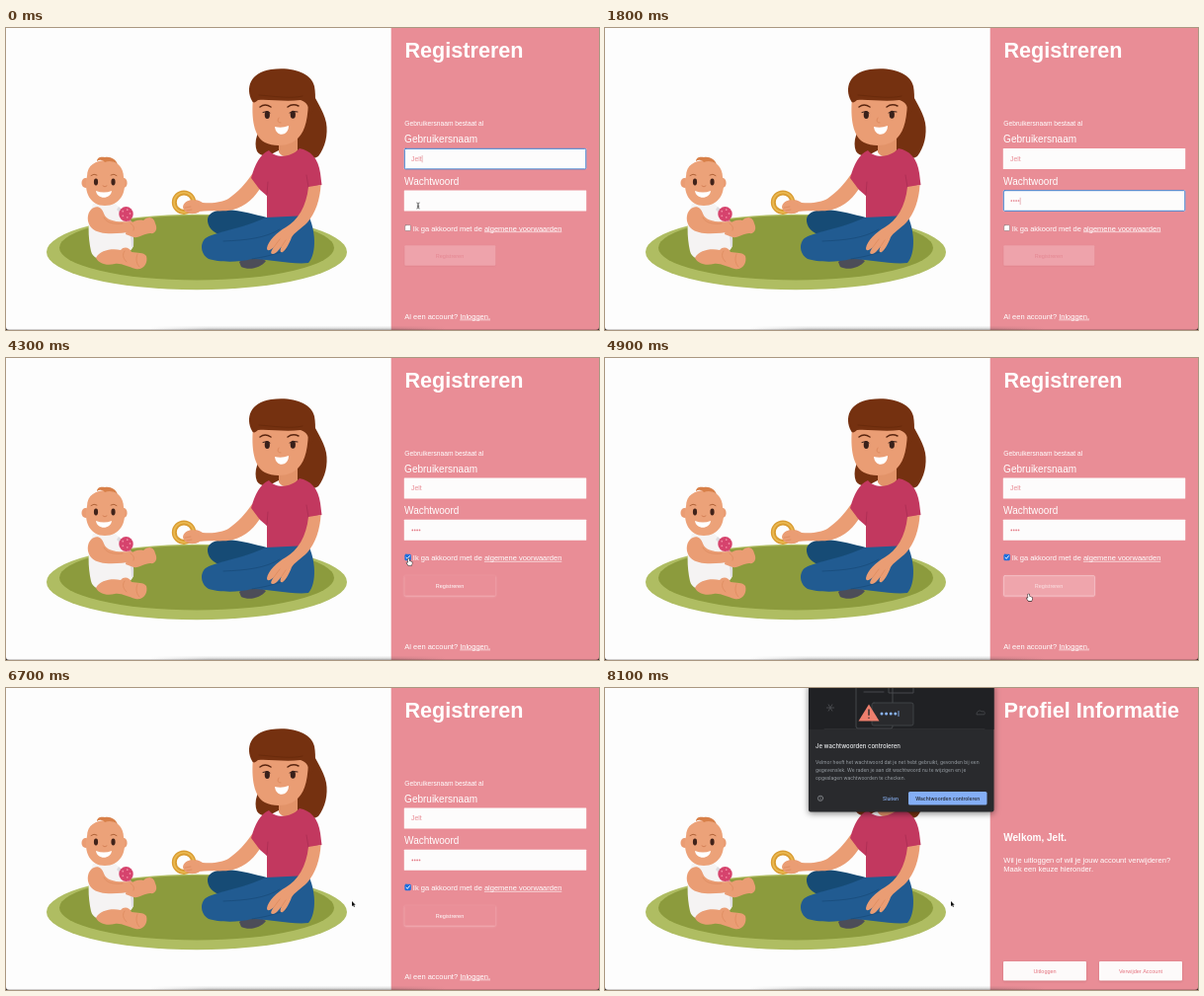
Write an HTML page with a canvas that moves like this. It is 600x306 px and loops after 8.2 s.

```html
<!DOCTYPE html>
<html lang="nl">
<head>
<meta charset="utf-8">
<title>Registreren</title>
<style>
  html, body { margin: 0; width: 100%; height: 100%; overflow: hidden; background: #fdfdfd; }
  canvas { display: block; width: 600px; height: 306px; }
</style>
</head>
<body>
<canvas id="stage"></canvas>
<script>
const W = 600, H = 306, LOOP = 8200;
const PINK = '#e98d96', SKIN = '#ea9d74', SKIN_DARK = '#d98558', HAIR = '#753110';
const SANS = '"Liberation Sans", Arial, sans-serif';
const UI = 'Inter, Roboto, sans-serif';
const USER = 'Jelt';

const canvas = document.getElementById('stage');
const ctx = canvas.getContext('2d');
const dpr = window.devicePixelRatio || 1;
canvas.width = W * dpr;
canvas.height = H * dpr;

// Moments at which the page reacts
const T = { focus: 350, type: 1100, key: 190, check: 3900, hover: 4650, leave: 5550, profile: 6800, dialog: 7700 };

// Pointer path: time, x, y
const ROUTE = [
  [0, 417, 177], [2700, 417, 177], [3250, 406, 202.5], [4250, 406, 202.5],
  [4750, 428, 239.5], [5450, 428, 239.5], [6000, 350, 216], [LOOP, 350, 216]
];

function fill(d, color) {
  ctx.fillStyle = color;
  ctx.fill(new Path2D(d));
}

function line(d, color, width = 1) {
  ctx.strokeStyle = color;
  ctx.lineWidth = width;
  ctx.lineCap = ctx.lineJoin = 'round';
  ctx.stroke(new Path2D(d));
}

function oval(x, y, rx, ry, color) {
  ctx.fillStyle = color;
  ctx.beginPath();
  ctx.ellipse(x, y, rx, ry, 0, 0, Math.PI * 2);
  ctx.fill();
}

function ring(x, y, r, color, width) {
  ctx.beginPath();
  ctx.arc(x, y, r, 0, Math.PI * 2);
  ctx.strokeStyle = color;
  ctx.lineWidth = width;
  ctx.stroke();
}

function box(x, y, w, h, r, color, edge, width = 1) {
  ctx.beginPath();
  ctx.roundRect(x, y, w, h, r);
  if (color) { ctx.fillStyle = color; ctx.fill(); }
  if (edge) { ctx.strokeStyle = edge; ctx.lineWidth = width; ctx.stroke(); }
}

function shadowed(color, blur, dy, draw) {
  ctx.save();
  ctx.shadowColor = color;
  ctx.shadowBlur = blur * dpr;
  ctx.shadowOffsetY = dy * dpr;
  draw();
  ctx.restore();
}

function text(str, x, y, size, color = '#fff', { weight = 400, font = SANS, align = 'left', under = false } = {}) {
  ctx.font = `${weight} ${size}px ${font}`;
  ctx.textAlign = align;
  ctx.fillStyle = color;
  ctx.fillText(str, x, y);
  const w = ctx.measureText(str).width;
  if (under) ctx.fillRect(x, y + 0.9, w, 0.6);
  return x + w;
}

function drawRug() {
  oval(193, 227, 152, 38.2, '#afbd62');
  oval(193, 222.7, 139, 32.7, '#8c9b3d');
}

function drawBaby() {
  // Onesie
  fill('M88 178C82 194 83 212 86 226C88 234 97 236 106 234C117 232 126 228 129 221C130 204 122 186 110 178Z', '#f5f3f3');
  fill('M112 184C121 192 127 206 127 222L129 221C131 204 123 188 114 181Z', '#dedce0');
  // Legs
  fill('M121 209C122 199 131 193 139 195C143 190 150 191 151 198C154 204 151 209 146 208C140 208 135 213 129 212Z', SKIN);
  fill('M91 233C95 225 107 223 116 225C119 221 125 222 127 227C133 228 139 227 142 231C144 238 139 246 131 244C123 242 117 238 110 239C102 241 94 239 91 233Z', SKIN);
  line('M120 226C117 230 119 234 122 237M133 229C131 234 132 239 135 242', SKIN_DARK, 0.6);
  // Rattle
  line('M122 190L128 200', '#e58ba0', 2.4);
  oval(121.5, 188.5, 7.2, 7.4, '#d6436d');
  for (let i = 0; i < 5; i++) {
    const a = i * Math.PI * 0.4;
    oval(121.5 + 4 * Math.cos(a), 188 + 4 * Math.sin(a), 0.9, 0.9, '#f08aa3');
  }
  // Arm
  fill('M86 184C91 179 97 181 99 188C102 196 113 197 125 196C132 196 134 204 128 206C113 209 94 210 87 203C81 197 82 188 86 184Z', SKIN);
  line('M99 192C102 198 110 199 118 198M126 198C129 200 130 202 129 205', SKIN_DARK, 0.6);
  // Head
  oval(80.5, 157, 4, 5, SKIN);
  oval(119, 157, 3.6, 5, SKIN);
  fill('M82 150C82 139 91 134 101 134C112 134 119 141 119 151C123 167 115 180 100 180C86 180 78 167 82 150Z', '#eca279');
  fill('M92 135C92 131 96 130 100 131C106 130 111 133 113 138C108 134.5 104 134.5 100 136C98 133.5 95 133 92 135Z', '#d88049');
  line('M86 149.5Q89 147 92 149M106 149Q109 147 112 149.5', '#a95c32', 0.9);
  oval(91, 156, 2.1, 3.4, '#40231a');
  oval(108.5, 156, 2.1, 3.4, '#40231a');
  line('M98 160Q100 162 102 160', '#d27d53', 0.9);
  fill('M91 165Q99 168 107 165C106 174 92 174 91 165Z', '#fff');
}

function drawMother() {
  // Hair behind the face
  fill('M262 96C255 103 250 115 254 125C258 131 266 130 272 126L288 118L288 126C296 133 308 135 316 130C323 121 326 108 324 96C321 82 313 74 308 60Z', HAIR);
  // Back leg
  fill('M204 196C203 188 211 184 223 184C239 185 252 189 264 192L304 190L300 206L222 211C212 209 205 204 204 196Z', '#164b75');
  // Neck and far arm
  fill('M276 112L295 108L295 124C290 133 280 132 276 126Z', '#e29369');
  fill('M249 148L259 159C253 171 242 181 230 184C217 187 207 184 195 186C190 190 183 188 180 185L181 178C186 173 193 173 199 177C211 178 219 176 225 173C235 166 242 158 249 148Z', SKIN);
  // Shirt
  fill('M266 124C272 132 288 132 297 122C308 124 316 132 318 147L319.5 159L306 162L306 194L264 193L264 170L257 164L248 152C252 138 257 128 266 124Z', '#c2385f');
  line('M264 169L265 156M306 161L304 149', '#a62c51', 0.7);
  // Face
  fill('M250 70C248 92 251 110 262 116C272 121 288 120 296 111C303 104 306 90 306 70C290 60 266 61 250 70Z', SKIN);
  fill('M249 74C242 61 247 45 268 42C291 39 309 46 312 59C314 70 313 84 308 89C307 81 305 75 298 73C282 75 266 72 255 73C252 76 250 76 249 74Z', HAIR);
  line('M256 68C270 69 287 72 300 69', '#622809', 0.6);
  line('M257 80Q262 76 268 80M285 80Q290 76 296 79', '#5a2610', 1.5);
  line('M260 85.5L264 84.5L267 86M287 86L291 84.5L295 85', '#38201a', 1);
  oval(264.3, 88, 2.6, 4, '#38201a');
  oval(290.3, 87.7, 2.6, 4, '#38201a');
  line('M276 91Q273 96 278 96', SKIN_DARK, 0.8);
  fill('M272 100Q279 102 286 99C286 110 273 111 272 100Z', '#fff');
  // Shoe and front leg
  fill('M236 237C243 231 255 231 263 236C258 243 246 246 238 242Z', '#4c4d58');
  fill('M263 192L306 190C313 204 315 228 306 238C290 240 266 234 249 234C234 238 214 237 205 234C198 230 196 221 200 215C206 207 232 206 263 192Z', '#215b91');
  line('M220 216C244 215 262 213 277 204M249 234C260 232 273 230 284 224', '#184a78', 0.7);
  // Near arm
  fill('M306 161L318.5 159C318 173 313 188 305 197C298 204 292 207 289 212C287 218 283 225 280 227C277 228 277 225 279 221C276 225 273 229 270 229C267 229 268 226 271 222C268 225 264 227 264 223C265 216 274 207 283 202C295 195 304 181 306 161Z', SKIN);
  line('M271 222L277 214M279 221L283 215', SKIN_DARK, 0.6);
  // Toy ring
  ring(180, 176.7, 9.7, '#d99c32', 5);
  ring(180, 176.7, 10, '#ebba53', 1.6);
  fill('M179 181C180 176 186 173 194 175L196 186C190 190 179 188 179 181Z', SKIN);
  line('M181 182L187 181M183 185L188 184', SKIN_DARK, 0.6);
}

function drawWindowEdge() {
  const g = ctx.createLinearGradient(146, 0, 446, 0);
  g.addColorStop(0, 'rgba(60,60,60,0)');
  g.addColorStop(0.2, 'rgba(60,60,60,.11)');
  g.addColorStop(0.8, 'rgba(60,60,60,.11)');
  g.addColorStop(1, 'rgba(60,60,60,0)');
  ctx.fillStyle = g;
  ctx.fillRect(146, 302.5, 300, 3.5);
  ctx.fillRect(146, 304, 300, 2);
  ctx.fillStyle = 'rgba(40,30,32,.35)';
  ctx.fillRect(0, 305.4, W, 0.6);
  fill('M0 303Q0 306 3 306H0ZM600 303Q600 306 597 306H600Z', '#2a2627');
}

function drawInput(y, focused) {
  box(402.8, y, 184.4, 21, 0.5, '#fdfcfc');
  if (focused) box(403.3, y + 0.3, 183.5, 20.6, 1, null, '#3f7fce', 1);
}

function drawCaret(x, y) {
  ctx.fillStyle = '#d9868f';
  ctx.fillRect(x + 0.2, y - 6, 0.6, 7.3);
}

function drawForm(t) {
  const checked = t >= T.check;
  const inName = t < T.focus;
  const inPass = !inName && !checked;
  const dots = Math.max(0, Math.min(4, Math.floor((t - T.type) / T.key) + 1));
  const lastKey = dots ? T.type + (dots - 1) * T.key : T.focus;
  const caretOn = (t - lastKey) % 1000 < 500;

  text('Registreren', 403.5, 30, 21.6, '#fff', { weight: 700 });
  ctx.save();
  if (checked) ctx.translate(0, -0.6);
  text('Gebruikersnaam bestaat al', 403.3, 99.2, 6.66);
  text('Gebruikersnaam', 403.1, 116.3, 10);
  drawInput(122, inName);
  const nameEnd = text(USER, 410, 135, 6.8, PINK);
  if (inName) drawCaret(nameEnd, 135);

  text('Wachtwoord', 403.1, 158.8, 10);
  drawInput(164.4, inPass);
  for (let i = 0; i < dots; i++) oval(411.3 + i * 2.4, 175, 0.85, 0.85, '#e37985');
  if (inPass && caretOn) drawCaret(410 + dots * 2.4, 177.8);

  box(403.7, 199.7, 5.8, 5.8, 1, checked ? '#1f6fde' : '#fff', checked ? '#1f6fde' : '#8b7376', 0.6);
  if (checked) line('M405 202.7L406.2 204L408.4 201.1', '#fff', 0.9);
  const x = text('Ik ga akkoord met de ', 411.8, 205.6, 7.5);
  text('algemene voorwaarden', x, 205.6, 7.5, '#fff', { under: true });
  ctx.restore();

  const hover = t >= T.hover && t < T.leave;
  const face = hover ? '#efa5ac' : checked ? '#ea8f98' : '#eea3ab';
  shadowed(checked ? 'rgba(255,225,228,.55)' : 'rgba(190,90,100,.2)', 2, 0.6,
    () => box(403.3, 220.3, 92, 20.5, 1, face));
  if (hover) box(403.6, 220.6, 91.8, 20.5, 1, null, '#f5c3c8', 0.8);
  text('Registreren', 449, 232.7, 5.5, hover ? '#fbe3e5' : checked ? '#fff' : '#e48691', { align: 'center' });

  const end = text('Al een account? ', 403.3, 294.7, 7.5);
  text('Inloggen.', end, 294.7, 7.5, '#fff', { under: true });
}

function drawProfile() {
  text('Profiel Informatie', 403.5, 30, 21.6, '#fff', { weight: 700 });
  text(`Welkom, ${USER}.`, 403.3, 155, 10, '#fff', { weight: 700 });
  text('Wil je uitloggen of wil je jouw account verwijderen?', 403.3, 177.2, 7.53);
  text('Maak een keuze hieronder.', 403.3, 185.9, 7.53);
  [['Uitloggen', 403], ['Verwijder Account', 500]].forEach(([label, x]) => {
    shadowed('rgba(150,60,70,.35)', 2.5, 0.8, () => box(x, 277, 84, 19.5, 1, '#fdfafa'));
    text(label, x + 42, 288.8, 5.5, '#e5727e', { align: 'center' });
  });
}

function drawDialog(t) {
  ctx.save();
  ctx.globalAlpha = Math.min(1, (t - T.dialog) / 120);
  shadowed('rgba(0,0,0,.5)', 6, 1.5, () => box(206, -4, 187.5, 129.5, 2, '#292a2d'));
  ctx.fillStyle = '#202124';
  ctx.fillRect(206, 0, 187.5, 42);

  const grey = '#4b4d51';
  for (let i = 0; i < 3; i++) {
    const a = i * Math.PI / 3, c = 3.6 * Math.cos(a), s = 3.6 * Math.sin(a);
    line(`M${228 - c} ${20 - s}L${228 + c} ${20 + s}`, grey, 0.9);
  }
  box(254, -6, 37, 47, 2, null, grey, 0.9);
  line('M262 4H282M287 0V5H312V0', grey, 0.9);
  line('M376 26.5C376 23 380 22 381 24C384 23 385 25 384 26.5Z', grey, 0.8);
  line('M222 41.5H384', '#36383b', 0.6);
  box(270, 15, 42, 23, 2, '#292a2d', '#46494d', 0.8);
  for (let i = 0; i < 4; i++) oval(280 + i * 4.6, 26, 1.5, 1.5, '#8ab4f8');
  line('M297 23.5V28.5', '#8ab4f8', 0.9);
  fill('M267 16.5L277.5 33.5H256.5Z', '#ee7f6d');
  line('M267 22V27.3M267 30.2V30.3', '#292a2d', 1.4);

  const ui = { font: UI };
  text('Je wachtwoorden controleren', 213, 60.5, 6, '#eceef0', { font: UI, weight: 500 });
  text('Velmor heeft het wachtwoord dat je net hebt gebruikt, gevonden bij een', 213, 76.7, 4.9, '#9aa0a6', ui);
  text('gegevenslek. We raden je aan dit wachtwoord nu te wijzigen en je', 213, 84.7, 4.9, '#9aa0a6', ui);
  text('opgeslagen wachtwoorden te checken.', 213, 92.6, 4.9, '#9aa0a6', ui);

  ring(218, 111.8, 2.6, '#a9adb2', 0.6);
  line('M218 111.7V113.1M218 110.4V110.5', '#a9adb2', 0.5);
  text('Sluiten', 289, 113.6, 4.9, '#8ab4f8', { font: UI, weight: 500, align: 'center' });
  box(307, 105, 79.5, 13.5, 1.6, '#84aef5');
  text('Wachtwoorden controleren', 346.8, 113.6, 5, '#202124', { font: UI, weight: 500, align: 'center' });
  ctx.restore();
}

function pointerAt(t) {
  const i = ROUTE.findIndex(p => p[0] > t);
  const [t0, x0, y0] = ROUTE[i - 1], [t1, x1, y1] = ROUTE[i];
  const u = (t - t0) / (t1 - t0), e = u * u * (3 - 2 * u);
  return [x0 + (x1 - x0) * e, y0 + (y1 - y0) * e];
}

function drawPointer(t) {
  if (t >= T.type && t < 2500) return;
  const [x, y] = pointerAt(t);
  const overBox = t > 3100 && t < 4350;
  const overButton = t >= T.hover && t < T.leave;
  ctx.save();
  ctx.translate(x, y);
  if (t < 2900) {
    line('M-1.3 0Q0 0 0 1V5Q0 6 -1.3 6M1.3 0Q0 0 0 1V5Q0 6 1.3 6M-.8 3.8H.8', '#333', 0.6);
  } else if (overBox || overButton) {
    const hand = 'M0 0Q1 -.6 1.3 .4L1.6 2.3L3.8 3Q4.5 3.4 4.2 4.6L3.6 6.6H.6L-1.3 4.2Q-1.2 3.2 .2 4Z';
    line(hand, '#333', 1.1);
    fill(hand, '#fff');
  } else {
    const arrow = 'M0 0V5.2L1.2 4.1L2 6L2.9 5.6L2.1 3.8H3.7Z';
    line(arrow, '#fff', 1.1);
    fill(arrow, '#111');
  }
  ctx.restore();
}

function draw(now) {
  const t = now % LOOP;
  ctx.setTransform(dpr, 0, 0, dpr, 0, 0);
  ctx.fillStyle = '#fdfdfd';
  ctx.fillRect(0, 0, W, H);
  drawRug();
  drawBaby();
  drawMother();
  ctx.fillStyle = PINK;
  ctx.fillRect(389.7, 0, W - 389.7, H);
  if (t < T.profile) drawForm(t); else drawProfile();
  drawWindowEdge();
  if (t >= T.dialog) drawDialog(t);
  drawPointer(t);
}

const start = performance.now();
function tick() {
  draw(performance.now() - start);
  requestAnimationFrame(tick);
}
tick();
</script>
</body>
</html>
```
